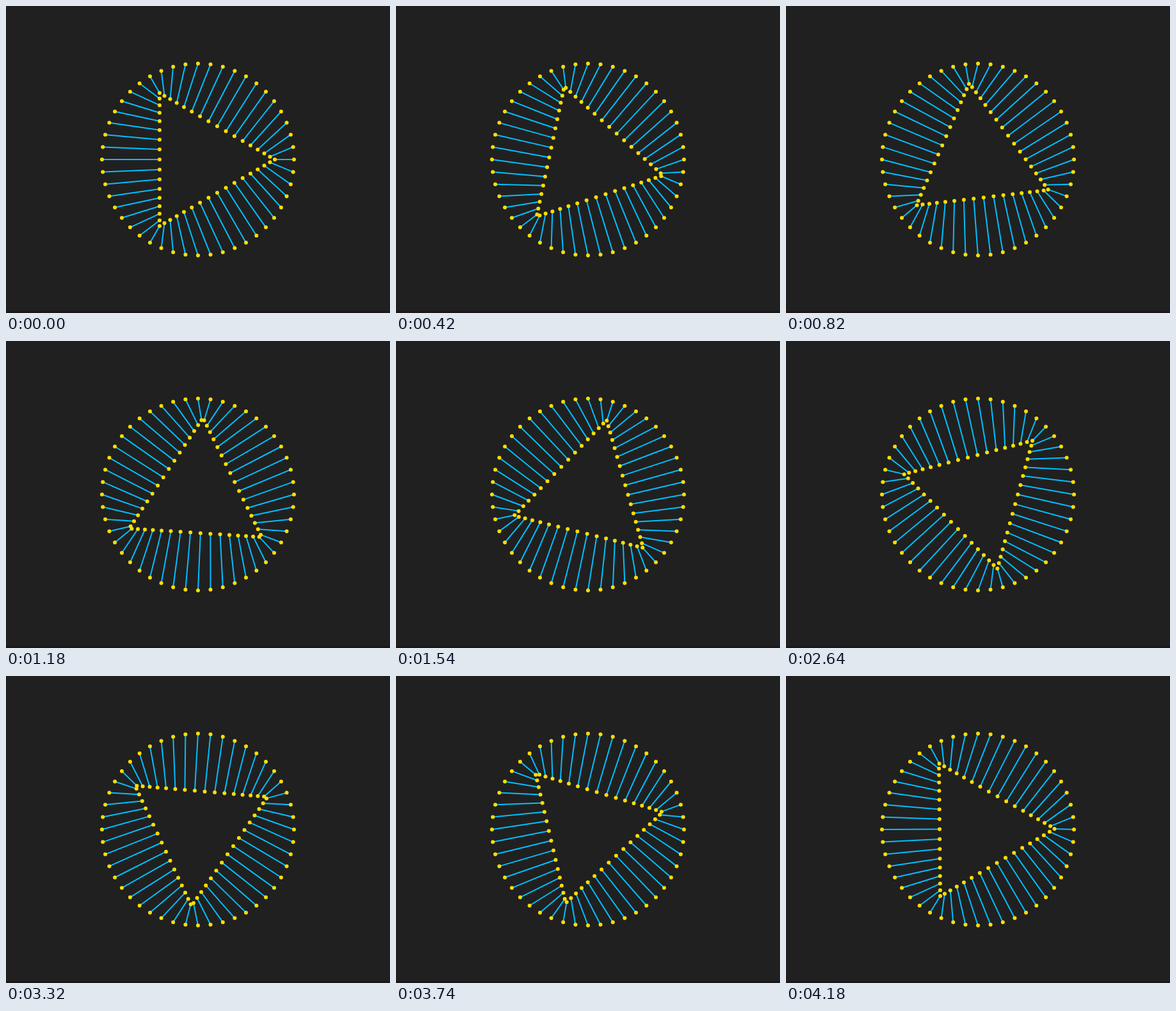
Write an HTML page with a canvas that moves like this. It is 600 px wide and 480 px high and loops after 4.2 s.

```html
<!DOCTYPE html>
<html>
<head>
<meta charset="utf-8">
<style>
html, body { margin: 0; width: 100%; height: 100%; overflow: hidden; background: #202020; }
canvas { display: block; }
</style>
</head>
<body>
<canvas id="stage" width="600" height="480"></canvas>
<script>
const ctx = document.getElementById('stage').getContext('2d');
const LOOP = 4200, STEP = 20;
const COUNT = 48, OUTER = 150, INNER = 120;
const CX = 300, CY = 240;
const TAU = Math.PI * 2, THIRD = TAU / 3;

// Project a point of the inner circle onto the nearest side of the turned triangle.
function project(angle, turn) {
  const side = Math.floor((angle - turn) / THIRD + 1e-9);
  const normal = turn + (side + 0.5) * THIRD;
  const along = INNER * Math.sin(angle - normal);
  const c = Math.cos(normal), s = Math.sin(normal);
  return [CX + INNER / 2 * c - along * s, CY + INNER / 2 * s + along * c];
}

function dot([x, y]) {
  ctx.beginPath();
  ctx.arc(x, y, 3, 0, TAU);
  ctx.fill();
}

function draw(time) {
  const t = Math.floor((time % LOOP) / STEP) * STEP;
  const turn = THIRD * t / LOOP;

  ctx.fillStyle = '#202020';
  ctx.fillRect(0, 0, 600, 480);
  ctx.fillStyle = '#1a161a';
  ctx.fillRect(0, 477, 600, 3);

  const rods = Array.from({ length: COUNT }, (_, i) => {
    const a = i * TAU / COUNT;
    return [[CX + OUTER * Math.cos(a), CY + OUTER * Math.sin(a)], project(a, turn)];
  });

  ctx.strokeStyle = '#00bfff';
  ctx.lineWidth = 2;
  ctx.beginPath();
  for (const [from, to] of rods) {
    ctx.moveTo(...from);
    ctx.lineTo(...to);
  }
  ctx.stroke();

  ctx.fillStyle = '#ffde00';
  rods.flat().forEach(dot);
}

const start = performance.now();
function tick() {
  draw(performance.now() - start);
  requestAnimationFrame(tick);
}
tick();
</script>
</body>
</html>
```
